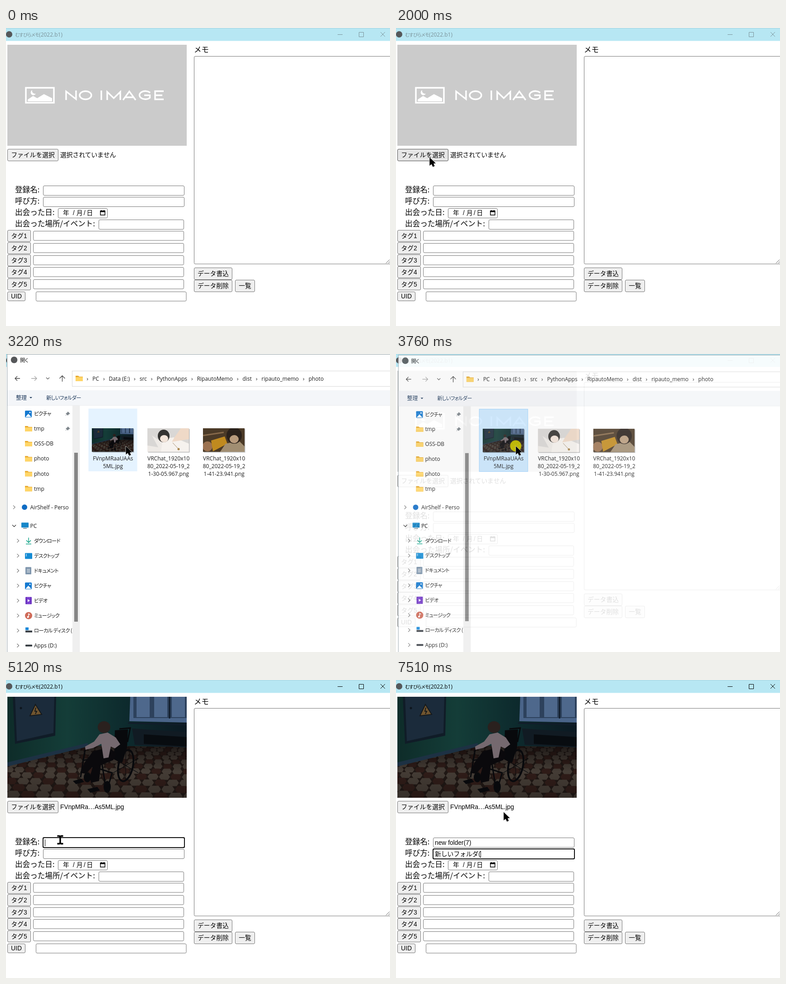
Recreate the animation shown at these times as an HTML page. Size 850 px wide and 658 px high, loop 8000 ms.

```html
<!DOCTYPE html>
<html lang="ja">
<head>
<meta charset="utf-8">
<title>Memo</title>
<style>
html, body { margin: 0; width: 100%; height: 100%; overflow: hidden; background: #fff; }
svg { display: block; }
text { white-space: pre; font-weight: 350; }
.form { font-family: "Liberation Sans", "Noto Sans CJK JP", "Noto Sans CJK", sans-serif; font-size: 13.8px; }
.label { font-family: "Noto Sans CJK JP", "Noto Sans CJK", sans-serif; font-size: 16.6px; }
.ui { font-family: "Open Sans", "Noto Sans", "Noto Sans CJK JP", "Noto Sans CJK", sans-serif; font-size: 12px; font-weight: 400; fill: #1b1b1b; }
.kana { font-family: "Noto Sans CJK JP", "Noto Sans CJK", sans-serif; font-size: 11.4px; font-weight: 350; font-feature-settings: "palt"; letter-spacing: -.7px; }
.name { font-size: 10.4px; }
.tool { fill: #1e395b; }
.mid { text-anchor: middle; }
</style>
</head>
<body>
<svg id="stage" width="850" height="658" viewBox="0 0 850 658"></svg>
<script>
const LOOP = 8000;
const $ = id => document.getElementById(id);
const range = n => [...Array(n).keys()];
const rect = (x, y, w, h, fill, more = '') =>
  `<rect x="${x}" y="${y}" width="${w}" height="${h}" fill="${fill}" ${more}/>`;
const poly = (points, fill, more = '') => `<polygon points="${points}" fill="${fill}" ${more}/>`;
const line = (d, color, w = 1, more = '') =>
  `<path d="${d}" fill="none" stroke="${color}" stroke-width="${w}" ${more}/>`;
const dot = (x, y, r, fill, more = '') => `<circle cx="${x}" cy="${y}" r="${r}" fill="${fill}" ${more}/>`;
const oval = (x, y, rx, ry, fill, more = '') =>
  `<ellipse cx="${x}" cy="${y}" rx="${rx}" ry="${ry}" fill="${fill}" ${more}/>`;
const text = (x, y, s, cls, more = '') => `<text x="${x}" y="${y}" class="${cls}" ${more}>${s}</text>`;

// Form: four labelled rows, five tag rows, then the rest
const fieldY = i => Math.round(348 + i * 24.9);
const controls = [];
const button = (x, y, w, h, caption) => controls.push({ x, y, w, h, caption });
const field = (x, y, right, h = 21.5, plain) => controls.push({ x, y, w: right - x, h, plain });
const rows = [['登録名:', 82, 395], ['呼び方:', 82, 395], ['出会った日:', 115, 225], ['出会った場所/イベント:', 205, 394]];
rows.forEach(([, x, right], i) => field(x, fieldY(i), right, 22, i === 2));
range(5).forEach(i => {
  const y = Math.round(446 + i * 26.8);
  button(3, y, 52, 26, 'タグ' + (i + 1));
  field(60, y + 2, 394);
});
button(3, 582, 40, 21, 'UID');
field(66, 582, 399.5);
button(3, 267, 113, 27, 'ファイルを選択');
field(416, 62, 856, 459.5);
button(416, 529, 85, 27, 'データ書込');
button(416, 556, 85, 27, 'データ削除');
button(507, 556, 44, 27, '一覧');

const control = ({ x, y, w, h, caption }, i) =>
  rect(x + .5, y + .5, w - 1, h - 1, caption ? '#efefef' : '#fff', `id="c${i}" rx="2.5" stroke="#767676"`) +
  (caption ? text(x + w / 2, y + h / 2 + 4.8, caption, 'form mid') : '');

function noImage() {
  const letters = 'M133 159V140L155 157V138M163 148.5a13 9 0 1 0 26 0a13 9 0 1 0 -26 0M211 138V159' +
    'M224 159V141L238.5 155L253 141V159M259 159L273 140L287 159M264 153H282' +
    'M319 143A13 9 0 1 0 318.5 154V148.5H306M349 139.5H330V157.5H349M330 148.5H346';
  return rect(3, 37, 397, 223, '#cbcbcb') +
    rect(44, 132, 62, 33, 'none', 'stroke="#fff" stroke-width="3.5"') +
    '<path d="M48 162V158L60 150L69 155L84 146L102 155V162ZM58 137A6 6 0 1 0 66 145A6.5 6.5 0 0 1 58 137Z" fill="#fff"/>' +
    line(letters, '#fff', 3.4);
}

// Hexagonal floor tiles, growing towards the viewer
function tiles() {
  let out = '';
  for (let y = 106, r = 0; y < 230; r++) {
    const w = 13 + (y - 100) * .17, h = w * .26;
    for (let x = -20 - r % 2 * w / 2, n = r % 2; x < 420; x += w, n++) {
      const a = w * .3, b = w * .48, ty = y + x * .012;
      out += poly(`${x - b},${ty} ${x - a},${ty - h} ${x + a},${ty - h} ${x + b},${ty} ${x + a},${ty + h} ${x - a},${ty + h}`,
        (n + r) % 3 ? '#443c35' : '#2f1c18');
    }
    y += h * 2;
  }
  return out;
}

function photo() {
  const dark = '#08090c';
  const floor = '0,153 172,108 397,111 397,223 0,223';
  return '<g id="photo" clip-path="url(#frame)">' + rect(0, 0, 397, 223, 'url(#wall)') +
    poly(floor, '#1f1714') + `<g clip-path="url(#floor)">${tiles()}</g>` + poly(floor, 'url(#shade)') +
    poly('0,145 178,102 178,110 0,154', '#1d3143') +
    poly('276,70 397,78 397,112 282,106', '#111b23') + poly('302,83 397,89 397,110 302,104', '#080c10') +
    // cabinet
    poly('12,0 108,0 106,86 17,104', '#101c27') + poly('17,0 104,0 102,80 21,98', '#1b2b3b') +
    poly('62,17 76,39 50,42', '#71552f', 'stroke="#15191c" stroke-width="2"') +
    line('M63 24L61 32H65L62 38', '#15191c', 2) + dot(30, 25, 2.5, '#0d151d') +
    // window
    poly('272,0 397,0 397,57 270,54', '#4a6489') + rect(279, 0, 118, 47, '#2d415c') +
    range(3).map(i => rect(286 + i * 39, 0, 29, 45, '#4e688c')).join('') +
    line('M359 0V48M267 58L397 62', '#111c29', 3) +
    // chair
    poly('238,74 267,72 265,112 254,146 236,138', dark) + line('M248 71L272 69L266 100', dark, 3) +
    oval(262, 152, 16, 35, 'none', `transform="rotate(12 262 152)" stroke="${dark}" stroke-width="4"`) +
    range(6).map(i => line('M262 152V120', dark, 1, `transform="rotate(${i * 60} 262 152)"`)).join('') +
    oval(177, 178, 8, 11, dark) + oval(221, 199, 8, 13, dark) +
    line('M172 117L162 178M175 150L232 168L223 198M166 141L238 126M209 145L217 196', dark, 3) +
    poly('145,186 164,181 170,188 152,193', dark) + poly('177,204 199,199 205,207 184,212', dark) +
    // seated silhouette
    poly('190,120 225,112 242,126 234,140 207,151 203,186 185,190 183,176 189,154 174,170 161,168 171,145', '#0a090c') +
    poly('204,83 222,79 240,90 250,105 238,114 229,110 224,134 213,136 208,104 190,113 173,117 172,110 192,99', '#75696f') +
    oval(214, 67, 14, 13, '#2a211e') + '</g>';
}

const titleBar = rect(0, 0, 850, 28.5, '#b7e7f3') + rect(0, 0, 850, 1, '#a6d5e1') + dot(7, 14, 7, '#56585a') +
  '<g id="caption">' +
  text(20, 18.5, 'むすびらメモ<tspan class="ui" style="fill:inherit;letter-spacing:0">(2022.b1)</tspan>', 'kana name', 'stroke="none"') +
  '<path d="M734 14.5H745M781.5 9.5h10v10h-10ZM829 9L839 19M839 9L829 19" fill="none"/></g>';

const dateParts = [[126, '年'], [148, '/'], [156, '月'], [172, '/'], [178.5, '日']];
const app = titleBar + noImage() + `<g id="picked" transform="translate(3 37)">${photo()}</g>` +
  controls.map(control).join('') +
  rows.map(([s], i) => text(20, fieldY(i) + 15.3, s, 'label')).join('') + text(416, 53.5, 'メモ', 'label') +
  text(120, 285.3, '', 'form', 'id="file"') +
  dateParts.map(([x, s]) => text(x, 413, s, 'form')).join('') +
  rect(209, 404, 10, 9, 'none', 'stroke="#000" stroke-width="1.5"') + rect(208.5, 403.5, 11, 3, '#000') +
  line('M211 402V404M217 402V404', '#000', 1.5) +
  line('M841 519.5L849 511.5M846 519.5L850 515.5', '#555') +
  rect(82, 348, 313, 22, 'none', 'id="ring" rx="2" stroke="#101010" stroke-width="2"') +
  range(2).map(i => text(86, fieldY(i) + 15.6, '', 'form', `id="value${i}"`)).join('') +
  rect(86, 352, 1, 15, '#000', 'id="caret"');

// File dialog
const folder = (x, y) => `<path d="M${x} ${y - 6}h6l2 2h8v10h-16z" fill="#e8a92e"/>` + rect(x, y - 3, 16, 9, '#ffd567', 'rx="1"');
const icons = {
  folder: y => folder(42, y),
  pic: y => rect(42, y - 7, 15, 15, '#1479d0', 'rx="1.5"') + poly(`43,${y + 7} 49.5,${y} 56,${y + 7}`, '#fff') + dot(53, y - 3, 1.5, '#fff'),
  cloud: y => dot(41, y, 6, '#0f6cc4'),
  pc: y => rect(34, y - 7, 16, 11, '#1687c9', 'rx="1"') + rect(38, y + 5, 8, 1.5, '#6c7a84'),
  down: y => line(`M50 ${y - 7}v11m-5 -5l5 5l5 -5M44 ${y + 7}h12`, '#18a68b', 1.5),
  desk: y => rect(42, y - 6, 16, 13, '#148bd4', 'rx="1"') + line(`M44 ${y - 3}h2m-2 3h2`, '#fff', 1.5),
  doc: y => rect(43, y - 8, 13, 16, '#7f96ad', 'rx="1"') + line(`M46 ${y - 3}h7m-7 3h7m-7 3h7`, '#fff'),
  video: y => rect(43, y - 8, 14, 16, '#7a3fd0', 'rx="1"') + line(`M45 ${y - 7}v14m10 0v-14`, '#4f2196', 1.5, 'stroke-dasharray="2"') + poly(`48,${y - 3} 53,${y} 48,${y + 3}`, '#fff'),
  music: y => dot(50, y, 8, '#cf6a58') + line(`M50 ${y + 3}v-7l3 2`, '#fff', 1.5) + dot(48.5, y + 3, 2, '#fff'),
  sys: y => rect(43, y - 7, 7, 6, '#1687d8') + rect(43, y, 15, 4, '#343a40'),
  disk: y => rect(43, y - 2, 15, 4, '#343a40', 'rx="1"'),
};
const nav = [
  ['pic', 'ピクチャ'], ['folder', 'tmp'], ['folder', 'OSS-DB'], ['folder', 'photo'], ['folder', 'photo'], ['folder', 'tmp'],
  ['cloud', 'AirShelf - Perso'], ['pc', 'PC'], ['down', 'ダウンロード'], ['desk', 'デスクトップ'], ['doc', 'ドキュメント'],
  ['pic', 'ピクチャ'], ['video', 'ビデオ'], ['music', 'ミュージック'], ['sys', 'ローカル ディスク ('], ['disk', 'Apps (D:)'],
];
function navRow([icon, s], i) {
  const y = 132 + i * 33.05 + 8 * Math.min(2, Math.max(0, i - 5));
  const top = icon === 'cloud' || icon === 'pc';
  const chevron = icon === 'pc' ? `M14 ${y - 2}l4 4l4 -4` : `M${top ? 16 : 24.5} ${y - 4}l4 4l-4 4`;
  const pin = poly(`137,${y - 5} 142,${y} 139,${y + 1} 137,${y + 4} 132,${y - 1} 135,${y - 2}`, '#7d858b') +
    line(`M135 ${y + 1}l-3 3`, '#7d858b');
  return icons[icon](y) + text(top ? 53.5 : 62, y + 4.3, s, /[ァ-ヶ]/.test(s) ? 'ui kana' : 'ui') +
    (i > 5 ? line(chevron, icon === 'pc' ? '#222' : '#777', 1.2) : '') + (i < 2 ? pin : '');
}

const crumbs = ['PC', 'Data (E:)', 'src', 'PythonApps', 'RipautoMemo', 'dist', 'ripauto_memo', 'photo']
  .map(s => `<tspan dx="9">›</tspan><tspan dx="9">${s}</tspan>`).join('');
const files = [
  ['FVnpMRaaUAAs', '5ML.jpg'],
  ['VRChat_1920x10', '80_2022-05-19_2', '1-30-05.967.png'],
  ['VRChat_1920x10', '80_2022-05-19_2', '1-41-23.941.png'],
];
const thumbs = [
  '<use href="#photo" transform="scale(.2325)"/>',
  rect(0, 0, 92, 52, '#d9d7d5') + poly('10,16 34,32 45,52 0,52 0,38 24,42', '#eeeae6') +
    poly('34,24 58,20 92,34 92,52 30,52', '#f6f2ee') + poly('74,0 92,0 92,24 54,30 60,20', '#efd9c7') +
    oval(36, 17, 13, 14, '#343331') + oval(37, 23, 9, 8, '#f2e4d9') + line('M56 32L70 47', '#a18d70') + dot(69, 46, 2.5, '#a9854a'),
  rect(0, 0, 92, 52, '#4b3a27') + line('M0 16L46 9', '#86694a', 3) + dot(10, 40, 11, '#9c7250') +
    poly('18,27 48,18 54,34 22,51', '#c08a1f') + poly('50,34 80,28 92,40 92,52 38,52', '#a18e72') +
    oval(69, 16, 17, 18, '#2a211b') + oval(69, 24, 10, 9, '#b89b7d'),
];
function file(names, i) {
  const left = 190 + i * 123;
  return rect(left + 1.5, 165.5, 92, 52, '#000', 'opacity=".28"') +
    `<g transform="translate(${left} 164)" clip-path="url(#thumb)">${thumbs[i]}</g>` +
    names.map((s, n) => text(left + 46.7, 234.5 + n * 17.2, s, 'ui mid')).join('');
}

const dialog = '<g id="dialog">' + rect(2.5, .5, 860, 670, '#fff', 'stroke="#8f9da3"') +
  dot(18, 13, 7.3, '#56585a') + text(31, 18, '開く', 'ui kana') +
  line('M31 54H20M25 49L20 54L25 59M118.5 54L124.5 48L130.5 54M124.5 48V61', '#444', 1.3) +
  line('M56 54H68M63 49L68 54L63 59', '#a5a5a5', 1.3) + line('M89 52L92.5 55.5L96 52', '#555', 1.2) +
  rect(146.5, 37.5, 720, 34, '#fff', 'stroke="#d8d8d8"') + folder(154, 54) + text(169.5, 58.5, crumbs, 'ui') +
  rect(3, 80, 850, 33, '#f4f6f9') + rect(3, 113, 850, 1, '#ebedf0') +
  text(22, 101, '整理', 'ui tool') + poly('52,95 58,95 55,98', '#1e395b') + text(89, 101, '新しいフォルダー', 'ui kana tool') +
  `<g clip-path="url(#nav)">${nav.map(navRow).join('')}</g>` +
  rect(147, 114, 16.5, 550, '#efefef') + rect(151, 218, 8, 373, '#858585') +
  rect(182.5, 120.5, 108, 138.5, '#e5f3ff', 'id="item"') + files.map(file).join('') + '</g>';

const pointers = dot(0, 0, 12.5, '#e3dc00', 'id="ripple" opacity=".78"') + '<g id="pointer">' +
  poly('0,0 0,19.5 4.5,16 7.5,22 12,20 9.5,14.5 14.5,14', '#000', 'id="arrow" stroke="#fff" stroke-width=".6"') +
  line('M-6.5 -8.5H-2L0 -7L2 -8.5H6.5M0 -8V8M-6.5 8.5H-2L0 7L2 8.5H6.5', '#000', 3.5, 'id="beam"') +
  '<g id="glass">' + rect(-8, -12, 16, 25, '#000', 'opacity=".65"') +
  line('M-7 -10.5H7M-7 11.5H7M-5 -10V-5L-1 .5L-5 6V11M5 -10V-5L1 .5L5 6V11', '#fff', 1.6) +
  poly('-3,-4 3,-4 0,0', '#fff') + poly('-3.5,10 3.5,10 0,4', '#fff') + '</g></g>';

const gradient = (id, stops, more = '') => `<linearGradient id="${id}" ${more}>` +
  stops.map((s, i) => `<stop offset="${i / (stops.length - 1)}" stop-color="${s}"/>`).join('') + '</linearGradient>';
const clip = (id, shape) => `<clipPath id="${id}">${shape}</clipPath>`;

$('stage').innerHTML = '<defs>' + gradient('wall', ['#0e2c29', '#143d38', '#0d2a2d', '#0c1922']) +
  gradient('shade', ['#0b0808a0', '#0b080800', '#0b080840'], 'x2="0" y2="1"') +
  clip('nav', rect(3, 114, 143, 550)) + clip('thumb', rect(0, 0, 92, 52)) + clip('frame', rect(0, 0, 397, 223)) +
  clip('floor', poly('0,153 172,108 397,111 397,223 0,223')) + '</defs>' +
  rect(0, 0, 850, 658, '#fff') + app + dialog + pointers;

// Pointer moves: start, end, number of steps, control point, goal
const moves = [
  [380, 580, 4, [500, 480], [408, 433]],
  [780, 1250, 7, [230, 340], [74, 285]],
  [2070, 2140, 2, [150, 350], [280, 388]],
  [2670, 3220, 9, [240, 265], [265, 203]],
  [4350, 4630, 5, [190, 480], [70, 574]],
  [4700, 4910, 4, [-70, 420], [120, 353]],
  [5850, 5920, 2, [200, 310], [238, 291]],
];
function pointerAt(t) {
  let from = [650, 700];
  for (const [start, end, steps, via, to] of moves) {
    if (t < start) break;
    const p = Math.min(1, (Math.floor((t - start) / (end - start) * (steps - 1)) + 1) / steps);
    const q = 1 - p;
    from = from.map((a, i) => q * q * a + 2 * q * p * via[i] + p * p * to[i]);
  }
  return from;
}

// Dialog: time, opacity, scale
const fade = [[0, 0, 1], [2070, .6, .99], [2140, 1, 1], [3760, .88, .995], [3830, .3, .988], [3890, 0, 1]];
// Typing: time, field, text
const typing = [
  [4990, 0, ''], [5850, 0, 'new fol'], [5920, 0, 'new folder(7'], [6580, 0, 'new folder(7)'],
  [7370, 1, ''], [7440, 1, '新しい'], [7510, 1, '新しいフォルダ('],
];
const clicks = [[1660, 1800], [3620, 3830], [4980, 5120]];
const BLINK = 530;

const show = (id, on) => $(id).setAttribute('visibility', on ? 'visible' : 'hidden');
const set = (id, values) => { for (const k in values) $(id).setAttribute(k, values[k]); };

function drawTyping(t) {
  const done = typing.filter(k => k[0] <= t);
  for (const i of [0, 1]) $('value' + i).textContent = done.findLast(k => k[1] === i)?.[2] ?? '';
  const last = done.at(-1);
  show('ring', last);
  show('caret', last && (t - last[0]) % (2 * BLINK) < BLINK);
  if (!last) return;
  const value = $('value' + last[1]);
  const y = fieldY(last[1]);
  set('ring', { y });
  set('caret', { x: Math.round(86 + (last[2] && value.getComputedTextLength())), y: y + 4 });
}

function draw(t) {
  const [x, y] = pointerAt(t);
  const [, alpha, scale] = fade.findLast(k => k[0] <= t);
  const open = alpha > 0;
  const loaded = t >= 3890;
  const waiting = loaded && t < moves[4][0];
  const pressed = clicks.some(([a, b]) => t >= a && t < b);
  const active = loaded || (t >= 1660 && t < 2000);

  let beam = false;
  controls.forEach((c, i) => {
    const over = !open && x >= c.x && x < c.x + c.w && y >= c.y && y < c.y + c.h;
    if (over && !c.caption && !c.plain) beam = true;
    set('c' + i, { stroke: over ? '#4f4f4f' : '#767676' });
    if (c.caption) set('c' + i, { fill: over ? (pressed ? '#f5f5f5' : '#e5e5e5') : '#efefef' });
  });

  const ink = active ? '#000' : '#7b939a';
  set('caption', { fill: ink, stroke: ink });
  show('picked', loaded);
  $('file').textContent = loaded ? 'FVnpMRa…As5ML.jpg' : '選択されていません';
  drawTyping(t);

  set('dialog', {
    opacity: alpha, display: open ? 'inline' : 'none',
    transform: `translate(540 380) scale(${scale}) translate(-540 -380)`,
  });
  const chosen = t >= 3620;
  const onItem = x > 182 && x < 291 && y > 120 && y < 259;
  set('item', { fill: chosen ? '#cce8ff' : '#e5f3ff', stroke: chosen ? '#99d1ff' : 'none', opacity: onItem ? 1 : 0 });

  set('ripple', { cx: x, cy: y });
  show('ripple', pressed);
  set('pointer', { transform: `translate(${x} ${y})` });
  show('glass', waiting);
  show('beam', beam && !waiting);
  show('arrow', !beam && !waiting);
}

const start = performance.now();
function tick() {
  draw((performance.now() - start) % LOOP);
  requestAnimationFrame(tick);
}
tick();
</script>
</body>
</html>
```
